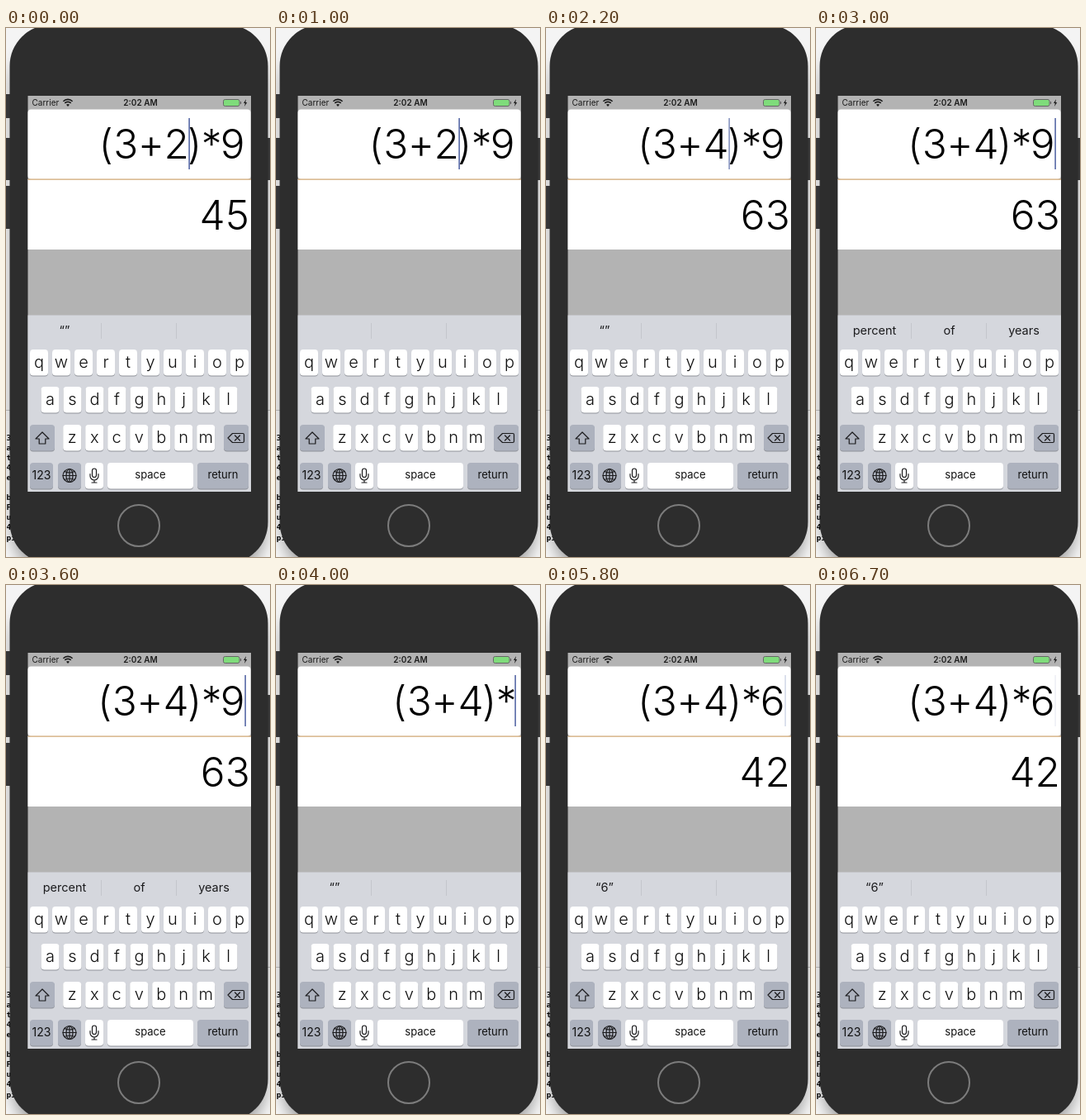
Animation of 320x640 px, one loop 6800 ms. Source, as an HTML page:

```html
<!DOCTYPE html>
<html lang="en">
<head>
<meta charset="utf-8">
<title>Calculator on a phone</title>
<style>
html, body { margin: 0; width: 100%; height: 100%; overflow: hidden; background: #f1f1f1; }
svg { display: block; width: 320px; height: 640px; font-family: Inter, "Open Sans", sans-serif; }
.mid, .big { text-anchor: middle; }
.big { font-size: 49.5px; font-weight: 350; }
.term { font: bold 9.5px "DejaVu Sans Mono", monospace; }
.line { fill: none; stroke: #1b1b1d; stroke-width: 1.2; stroke-linejoin: round; stroke-linecap: round; }
</style>
</head>
<body>
<svg viewBox="0 0 320 640">
  <defs>
    <filter id="soft" x="-20%" y="-20%" width="140%" height="140%"><feGaussianBlur stdDeviation="10"/></filter>
  </defs>
  <rect width="320" height="640" fill="#f4f4f4"/>
  <rect y="462" width="320" height="178" fill="#fafafa"/>
  <path d="M0 462.5H320" stroke="#c4c4c4"/>
  <rect x="8" y="20" width="306" height="640" rx="50" opacity=".4" filter="url(#soft)"/>
  <g id="term" class="term"></g>

  <g fill="#363637">
    <rect x="-2" y="80" width="9" height="29" rx="2"/>
    <rect x="-2" y="133" width="9" height="51" rx="2"/>
    <rect x="-2" y="191" width="9" height="52" rx="2"/>
    <rect x="315" y="133" width="8" height="51" rx="2"/>
  </g>
  <rect x="4.5" y="-4" width="313" height="652" rx="50" fill="#2d2d2d"/>
  <circle cx="161" cy="602" r="25" fill="none" stroke="#7c7c7c" stroke-width="2"/>

  <rect x="26.5" y="82" width="270.5" height="479" fill="#b3b3b3"/>
  <g fill="#1c1c1c">
    <text x="31.5" y="94" font-size="10">Carrier</text>
    <text class="mid" x="163" y="94" font-size="10" font-weight="600">2:02 AM</text>
    <path d="M75 95l-2-2.2a3 3 0 0 1 4 0z"/>
    <path d="M71.3 90.9a5.3 5.3 0 0 1 7.4 0M69.4 88.7a8 8 0 0 1 11.2 0" fill="none" stroke="#1c1c1c" stroke-width="1.6"/>
    <rect x="263.5" y="86.5" width="19.5" height="8" rx="2" fill="#7fdc7b" stroke="#666"/>
    <path d="M284.5 89v3" stroke="#666" stroke-width="1.3"/>
    <path d="M291 86l-3 5h1.8l-.8 4 3.2-5h-1.9z"/>
  </g>
  <rect x="26.5" y="98.5" width="270" height="84.5" rx="4" fill="#fff"/>
  <rect x="26.5" y="183" width="270.5" height="85" fill="#fff"/>
  <path d="M26.5 183.2H297" stroke="#cfa672" stroke-width="1.3"/>
  <text id="expr" class="big" y="158"></text>
  <text id="result" class="big" y="243.8"></text>
  <rect id="caret" y="109" width="1.6" height="62" fill="#5668a6"/>

  <rect x="26.5" y="347.5" width="270.5" height="213.5" fill="#d5d7dd"/>
  <path d="M115.5 357v19M206.5 357v19" stroke="#c4c6cc"/>
  <g id="hints" class="mid" font-size="14.5" fill="#1b1b1d"></g>
  <g id="keys" class="mid" fill="#111"></g>

  <path class="line" d="M44 489l-8 8h4.2v6h7.6v-6h4.2z"/>
  <path class="line" d="M274.5 490.5H287a1.5 1.5 0 0 1 1.5 1.5v8a1.5 1.5 0 0 1-1.5 1.5h-12.5l-5.5-5.5zM277.5 493l6 6m0-6l-6 6"/>
  <g class="line">
    <circle cx="77" cy="541.5" r="8"/>
    <ellipse cx="77" cy="541.5" rx="4" ry="8"/>
    <path d="M77 533.5v16M69 541.5h16M71 536.5q6 3 12 0M71 546.5q6-3 12 0"/>
  </g>
  <g class="line">
    <rect x="104.5" y="533" width="5" height="10.5" rx="2.5"/>
    <path d="M102 539.5v2.5a5 5 0 0 0 10 0v-2.5M107 547v3M104 550h6"/>
  </g>
</svg>
<script>
const LOOP = 6800, STEP = 100;
const $ = id => document.getElementById(id);

function add(parent, tag, attrs, text = "") {
  const el = document.createElementNS("http://www.w3.org/2000/svg", tag);
  for (const k in attrs) el.setAttribute(k, attrs[k]);
  el.textContent = text;
  parent.appendChild(el);
  return el;
}

function key(x, y, w, label, size = 20, fill = "#fff") {
  add($("keys"), "rect", { x, y: y + 1, width: w, height: 31.5, rx: 4, fill: "#8f9299" });
  add($("keys"), "rect", { x, y, width: w, height: 31.5, rx: 4, fill });
  add($("keys"), "text", {
    x: x + w / 2, y: y + 15.5 + size * 0.3, "font-size": size, "font-weight": size > 14 ? 350 : 400
  }, label);
}

const GREY = "#adb2be";
[["qwertyuiop", 29, 389], ["asdfghjkl", 42.5, 434], ["zxcvbnm", 69.2, 480]].forEach(([row, x, y]) =>
  [...row].forEach((c, i) => key(x + 27 * i, y, 22, c)));
key(29, 480, 30, "", 14, GREY);
key(264, 480, 30, "", 14, GREY);
key(29, 526, 28, "123", 14, GREY);
key(63, 526, 28, "", 14, GREY);
key(96, 526, 22, "");
key(123, 526, 104, "space", 13);
key(232, 526, 62, "return", 13, GREY);

[..."3at4e bFu4p"].forEach((c, i) =>
  add($("term"), "text", { x: 0.5, y: 498.5 + 12.1 * i }, c === "p" ? "pi" : c));

const hints = [71, 161.5, 252].map(x => add($("hints"), "text", { x, y: 370.5 }));

// Glyph advances in pixels; other digits use the default
const WIDE = { "(": 17, ")": 17, "*": 21, "+": 31.5, "4": 31.5 };
const NUDGE = { ")": -1.5, "(": -0.5 };
const advance = c => WIDE[c] || 30;
const width = s => [...s].reduce((sum, c) => sum + advance(c), 0);

function setLine(el, text, right) {
  let x = right - width(text);
  const xs = [...text].map(c => {
    const mid = x + advance(c) / 2 + (NUDGE[c] || 0);
    x += advance(c);
    return mid;
  });
  el.setAttribute("x", xs.join(" "));
  el.textContent = text;
}

// Each track lists [start time, value]
const BEFORE = [[0, "(3+2"], [800, "(3+"], [1000, "(3+2"], [1300, "(3+"], [1400, "(3+4"],
  [2800, "(3+4)*9"], [3700, "(3+4)*"], [4300, "(3+4)*6"]];
const AFTER = [[0, ")*9"], [2800, ""]];
const RESULT = [[0, "45"], [900, ""], [1100, "45"], [1600, "63"], [3800, ""], [4400, "42"]];
const HINTS = [[0, "“”"], [900, ""], [1100, "“”"], [2800, "percent,of,years"], [3800, "“”"], [4300, "“6”"]];
const CARET = [[100, 1], [400, 0], [500, 0], [700, 1], [1500, 1], [1800, 0], [1950, 0], [2300, 1],
  [2450, 1], [2700, 0], [2800, 1], [4500, 1], [4800, 0], [5000, 0], [5300, 1], [5500, 1],
  [5900, 0], [6000, 0], [6400, 1], [6500, 1], [6700, 0.1]];

const at = (track, t) => track.filter(k => k[0] <= t).pop()[1];

function ramp(track, t) {
  const i = track.findIndex(k => k[0] >= t);
  if (i < 1) return track[i < 0 ? track.length - 1 : 0][1];
  const [t0, a] = track[i - 1], [t1, b] = track[i];
  return a + (b - a) * (t - t0) / (t1 - t0);
}

function draw(ms) {
  const t = Math.floor((ms % LOOP) / STEP) * STEP;
  const tail = at(AFTER, t);
  setLine($("expr"), at(BEFORE, t) + tail, 289.7);
  setLine($("result"), at(RESULT, t), 295.7);
  $("caret").setAttribute("x", 289.3 - width(tail));
  $("caret").setAttribute("opacity", ramp(CARET, t));
  const words = at(HINTS, t).split(",");
  hints.forEach((el, i) => el.textContent = words[i] || "");
}

let start;
function tick(now) {
  start ??= now;
  draw(now - start);
  requestAnimationFrame(tick);
}
draw(0);
requestAnimationFrame(tick);
</script>
</body>
</html>
```
